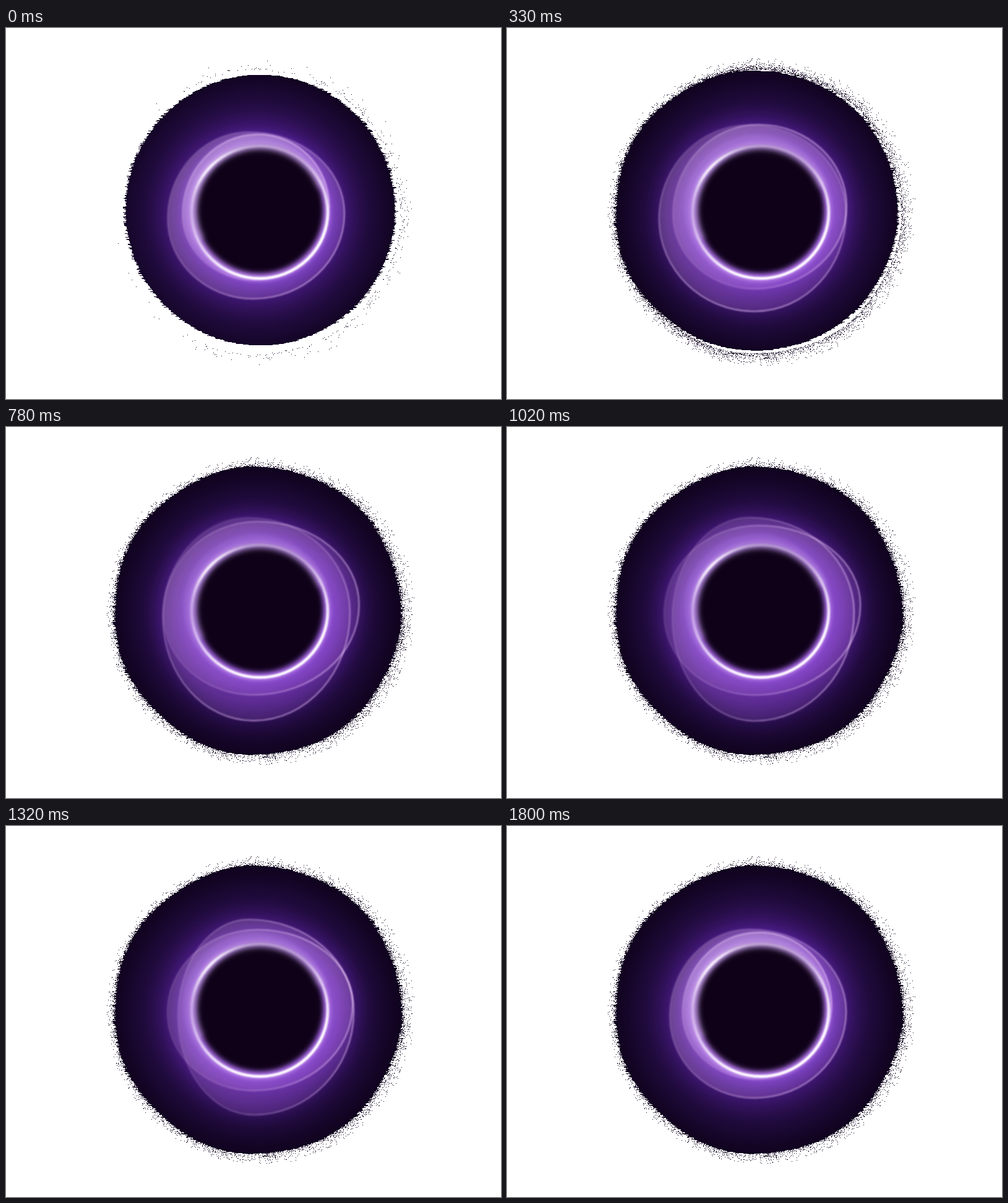
These frames come from a looping animation (800x600 px, 1830 ms). An HTML page with a canvas:

```html
<!DOCTYPE html>
<html lang="en">
<head>
<meta charset="utf-8">
<title>Violet ring</title>
<style>
  html, body { margin: 0; width: 100%; height: 100%; overflow: hidden; background: #fff; }
  canvas { display: block; }
</style>
</head>
<body>
<canvas id="stage" width="800" height="600"></canvas>
<script>
const ctx = document.getElementById('stage').getContext('2d');
const LOOP = 1830, STEP = 30, TAU = Math.PI * 2;
const CX = 411, CY = 297;

function random(seed) {
  return () => {
    seed = (seed + 0x6D2B79F5) | 0;
    let v = Math.imul(seed ^ (seed >>> 15), 1 | seed);
    v = (v + Math.imul(v ^ (v >>> 7), 61 | v)) ^ v;
    return ((v ^ (v >>> 14)) >>> 0) / 4294967296;
  };
}

// The disc grows first on the left and last on the right
function growth(angle, t) {
  const full = 640 + 320 * Math.cos(angle - 0.15);
  const u = Math.min(1, t / full);
  return u * u * (3 - 2 * u);
}

const smallRadius = angle => 219 - 3 * Math.sin(angle);
const fullRadius = angle => 233 - 4 * Math.cos(angle) + 1.2 * Math.sin(angle * 7 + 1);

function radius(angle, t) {
  const small = smallRadius(angle);
  return small + (fullRadius(angle) - small) * growth(angle, t);
}

const rnd = random(71);
const tail = () => -Math.log(1 - rnd());
const jag = () => Math.min(6, tail() * 2.5) - 2.5;
const rows = Array.from({ length: 600 }, () => ({ left: jag(), right: jag() }));
const dots = Array.from({ length: 6500 }, () => {
  const angle = rnd() * TAU;
  const spread = 5.2 + 2 * Math.cos(angle - 0.5);
  const r = fullRadius(angle) - 4 + spread * tail();
  return {
    angle, r, birth: rnd(),
    x: Math.round(CX + r * Math.cos(angle)),
    y: Math.round(CY + r * Math.sin(angle))
  };
}).filter(d => d.r < 250);

// Half width of the disc on one side of a row
function edge(dy, side, t) {
  let x = Math.sqrt(Math.max(0, 228 * 228 - dy * dy)), r = 228;
  for (let i = 0; i < 4; i++) {
    r = radius(Math.atan2(dy, side * x), t);
    x = Math.sqrt(Math.max(0, r * r - dy * dy));
  }
  return r > Math.abs(dy) ? x : 0;
}

function drawDisc(t) {
  ctx.fillStyle = '#0f031d';
  for (let y = 55; y < 540; y++) {
    const dy = y - CY, a = edge(dy, -1, t), b = edge(dy, 1, t);
    if (a + b < 8) continue;
    const left = Math.round(CX - a - rows[y].left);
    const right = Math.round(CX + b + rows[y].right);
    ctx.fillRect(left, y, right - left, 1);
  }
  for (const d of dots) {
    const early = 0.06 + 0.06 * Math.cos(d.angle - 0.2);
    if (1.7 * growth(d.angle, t) + early > d.birth) ctx.fillRect(d.x, d.y, 1, 1);
  }
}

// Both loops swell once and sway once per cycle
function tallLoop(swell, sway) {
  return {
    l: 261 - 17 * sway, r: 547 + 12 * swell - 6 * sway,
    t: 168 - 22 * swell, b: 438 + 38 * swell,
    tx: 392, ly: 308, ry: 300, light: 0.7 + 0.9 * sway
  };
}

function wideLoop(swell, sway) {
  return {
    l: 285 - 32 * swell, r: 522 + 50 * swell,
    t: 172 - 16 * swell - 8 * sway, b: 408 + 26 * swell,
    tx: 407, ly: 302, ry: 288, light: -1 + swell
  };
}

function loopPath({ l, r, t, b, tx, ly, ry }) {
  const k = 0.553, bx = 400, p = new Path2D();
  p.moveTo(tx, t);
  p.bezierCurveTo(tx + k * (r - tx), t, r, ry - k * (ry - t), r, ry);
  p.bezierCurveTo(r, ry + k * (b - ry), bx + k * (r - bx), b, bx, b);
  p.bezierCurveTo(bx - k * (bx - l), b, l, ly + k * (b - ly), l, ly);
  p.bezierCurveTo(l, ly - k * (ly - t), tx - k * (tx - l), t, tx, t);
  p.closePath();
  return p;
}

function oval(x, y, rx, ry, from = 0, to = TAU) {
  const p = new Path2D();
  p.ellipse(x, y, rx, ry, 0, from, to);
  return p;
}

function fill(path, style, blur) {
  ctx.filter = `blur(${blur}px)`;
  ctx.fillStyle = style;
  ctx.fill(path);
  ctx.filter = 'none';
}

function stroke(path, style, width, blur) {
  ctx.filter = `blur(${blur}px)`;
  ctx.strokeStyle = style;
  ctx.lineWidth = width;
  ctx.stroke(path);
  ctx.filter = 'none';
}

// Colour around a centre, its strength given by a function of the angle
function sweep(rgb, strength) {
  const g = ctx.createConicGradient(0, 408, 298), n = 32;
  for (let i = 0; i <= n; i++) {
    g.addColorStop(i / n, `rgba(${rgb},${strength(i / n * TAU).toFixed(3)})`);
  }
  return g;
}

function drawHalo() {
  const g = ctx.createRadialGradient(405, 299, 100, 405, 299, 240);
  g.addColorStop(0, 'rgb(50,21,100)');
  g.addColorStop(0.34, 'rgb(38,15,72)');
  g.addColorStop(0.58, 'rgb(18,8,36)');
  g.addColorStop(0.86, 'rgb(4,1,7)');
  g.addColorStop(1, '#000');
  ctx.fillStyle = g;
  ctx.fillRect(150, 50, 520, 500);
}

function drawLoop(loop, swell) {
  const path = loopPath(loop);
  const alpha = 0.38 - 0.17 * swell;
  const tint = ctx.createLinearGradient(loop.l, loop.t, loop.r, loop.b);
  tint.addColorStop(0.15, `rgba(165,140,160,${alpha})`);
  tint.addColorStop(0.85, `rgba(115,75,150,${alpha})`);
  fill(path, 'rgba(64,20,135,.36)', 17);
  fill(path, tint, 1.2);
  const line = sweep('215,175,235', a => 0.34 + 0.24 * Math.cos(a - loop.light));
  stroke(path, line, 2.4, 1);
}

const ring = oval(410, 298, 110, 107);
const band = oval(405, 291, 119, 118);
const hole = oval(410, 295, 103, 102);
const smear = oval(410, 295, 106, 103, Math.PI * 0.85, Math.PI * 1.88);

// Full from right to lower left, with a second peak at the upper left
function ringLight(a) {
  const lower = 0.5 + 0.7 * Math.cos(a - 1.1);
  const upper = 0.6 * Math.exp(-(((a - 3.9) / 0.4) ** 2));
  return Math.min(1, Math.max(0.25, lower) + upper);
}

function drawRing() {
  stroke(ring, 'rgba(60,25,200,.4)', 34, 10);
  fill(band, 'rgba(120,95,190,.16)', 2);
  ctx.globalCompositeOperation = 'source-over';
  fill(hole, '#0f0118', 4);
  ctx.globalCompositeOperation = 'screen';
  stroke(smear, 'rgba(150,132,165,.4)', 13, 4);
  stroke(ring, sweep('165,120,255', a => 0.6 * ringLight(a)), 9, 3);
  stroke(ring, sweep('255,250,255', ringLight), 4.5, 1.2);
}

function draw(t) {
  const u = t / LOOP;
  const swell = Math.sin(Math.PI * u), sway = Math.sin(TAU * u);
  ctx.globalCompositeOperation = 'source-over';
  ctx.fillStyle = '#fff';
  ctx.fillRect(0, 0, 800, 600);
  drawDisc(t);
  ctx.globalCompositeOperation = 'screen';
  drawHalo();
  drawLoop(tallLoop(swell, sway), swell);
  drawLoop(wideLoop(swell, sway), swell);
  drawRing();
}

const start = performance.now();
let last = -1;
function tick() {
  const t = Math.floor(((performance.now() - start) % LOOP) / STEP) * STEP;
  if (t !== last) draw(last = t);
  requestAnimationFrame(tick);
}
tick();
</script>
</body>
</html>
```
